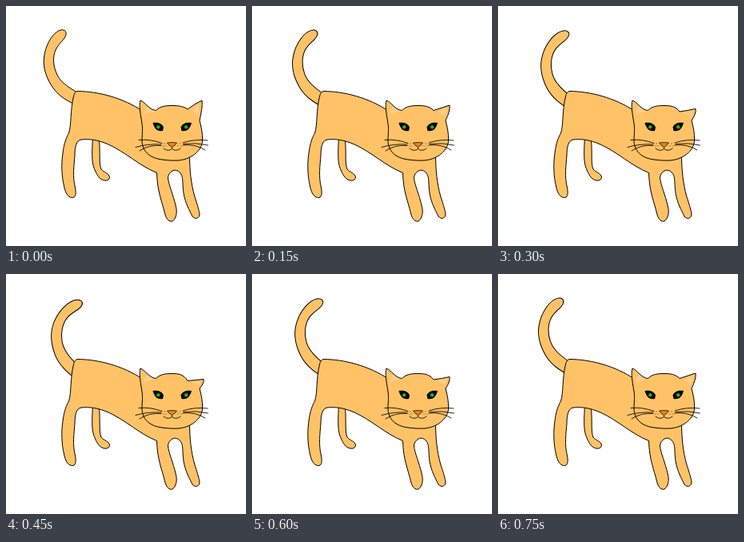
Write an HTML page that moves like this. It is 300 px wide and 300 px high and loops after 0.9 s.

```html
<!DOCTYPE html>
<html lang="en">
<head>
<meta charset="utf-8">
<title>Cat</title>
<style>
  html, body { margin: 0; width: 100%; height: 100%; overflow: hidden; background: #fff; }
  svg { display: block; width: 100vw; height: 100vh; }
  .fur { fill: #ffc266; stroke: #000; stroke-width: 1; stroke-linejoin: round; }
  .line { fill: none; stroke: #000; stroke-width: .85; stroke-linecap: round; }
  .sheen { fill: #ffce8c; }
</style>
</head>
<body>
<svg viewBox="0 0 300 300">
  <path id="tail" class="fur" d="M96 127 C84 122 70 117 60 104 C51 92 46 78 47.500 65 C49 49 58 34 67 30.500 C72 28.500 76 31 75 35.500 C74 42 66 46 62 55 C58 64 59 76 64 86 C69 96 78 102 98 113Z"/>
  <!-- far hind leg -->
  <path class="fur" d="M108.500 164 C107.500 180 107 193 109.500 201 C112 208 115 214 119 216.500 C123 219 129 219 129.500 214 C129 209 122 208 119 204 C116 197 118 186 116.500 166Z"/>
  <!-- body with near hind leg and both front legs -->
  <path class="fur" d="M90 106.500 C115 107 145 114 172 132 L229.500 185 C229.500 207 231.500 222 235.500 237 C239 248 241 254 242 260 C242 266 236 267 233 263 C229 255 224 246 222 234 C220.500 224 221.500 216 219.500 211.500 C217 206 212 204 208 206 C205 208 202.500 211 202.500 215 C203.500 224 209 236 212 249 C215 259 212 266 208 269 C204 270 201 267 199 261 C195 244 189 232 188.500 208.500 C167 200 150 183 128 173 C114 167 104 166 94 167 C88 168 86 176 86 187 C85 200 83 213 86.500 227 C88 235 87 240 82.500 239.500 C77 239 74 233 72.500 225 C69.500 213 69 197 71 184 C72.500 171 76 163 78.500 159 C82 148 80 131 84.500 113 C85.500 109 87 106.500 90 106.500Z"/>
  <path id="head" class="fur"/>
  <path class="sheen" d="M172 132 Q175 129 176.500 125.500 Q181 131 187 131.500 Q180 132 174 135Z"/>
  <path id="earSheen" class="sheen"/>
  <g id="eye">
    <path d="M183.500 146 C190 145 195 147 197 151.500 L196 156 C190 157 186 155 183.500 146Z"/>
    <circle cx="190.300" cy="151.300" r="2.300" fill="#24b010"/>
  </g>
  <use href="#eye" transform="matrix(-1 0 0 1 415.500 0)"/>
  <path d="M201.500 171 Q207.500 170 213.500 171 Q211.500 174.500 207.500 176.500 Q203.500 174.500 201.500 171Z" fill="#e08522" stroke="#000" stroke-width=".7"/>
  <path class="line" d="M207.500 177 V178.500 C205 181 200 181 197 178 M207.500 178.500 C210 181 215 181 218 178"/>
  <path class="line" d="M195 171.500 Q180 166 166 167.500 M194 173 Q177 172 162 176.500 M194 174.500 Q179 173 167 181"/>
  <path class="line" d="M221 171 Q236 166 252 168 M222 172.500 Q238 170.500 252.500 174 M221 174 Q236 172 249 180"/>
  <path class="line" d="M198 172h.1M200 175h.1M197 175h.1M217 172h.1M215 175h.1M219 175h.1"/>
</svg>
<script>
  const STEP = 150;
  const POSES = [0, 1, 2, 3, 2, 1];
  const EAR_TIP = [[245, 118], [247, 124], [247, 128.5], [247, 131.5]];
  const byId = id => document.getElementById(id);

  function draw(time) {
    const pose = POSES[Math.floor(time / STEP) % POSES.length];
    const [x, y] = EAR_TIP[pose];
    const root = 129 + pose * 1.5;

    byId('tail').setAttribute('transform',
      `translate(0 ${pose * 0.5}) rotate(${pose * 5.4} 77 106)`);
    byId('head').setAttribute('d', `M168 118 C174 120 179 130 187.5 130.5
      C193 125 200 124.5 208 124.5 C216 124.5 222 125.5 227 ${root}
      Q${x - 9} ${y + 4 - pose} ${x} ${y} Q${x + 1} ${y + 8 - pose} 242 143
      C244 151 246 159 245.5 168 C245.5 179 234 191 216 193 C209 193.4 202 193 195 192
      C179 190 170 181 170 168 C170 159 171.500 154 169.500 144 C168 134 166 124 168 118Z`);
    byId('earSheen').setAttribute('d',
      `M233 ${root + 1.5} Q238 ${y + 7 - pose} ${x - 4} ${y + 5 - pose} L241 ${137 + pose / 2}Z`);
  }

  function tick() {
    draw(performance.now());
    requestAnimationFrame(tick);
  }
  tick();
</script>
</body>
</html>
```
